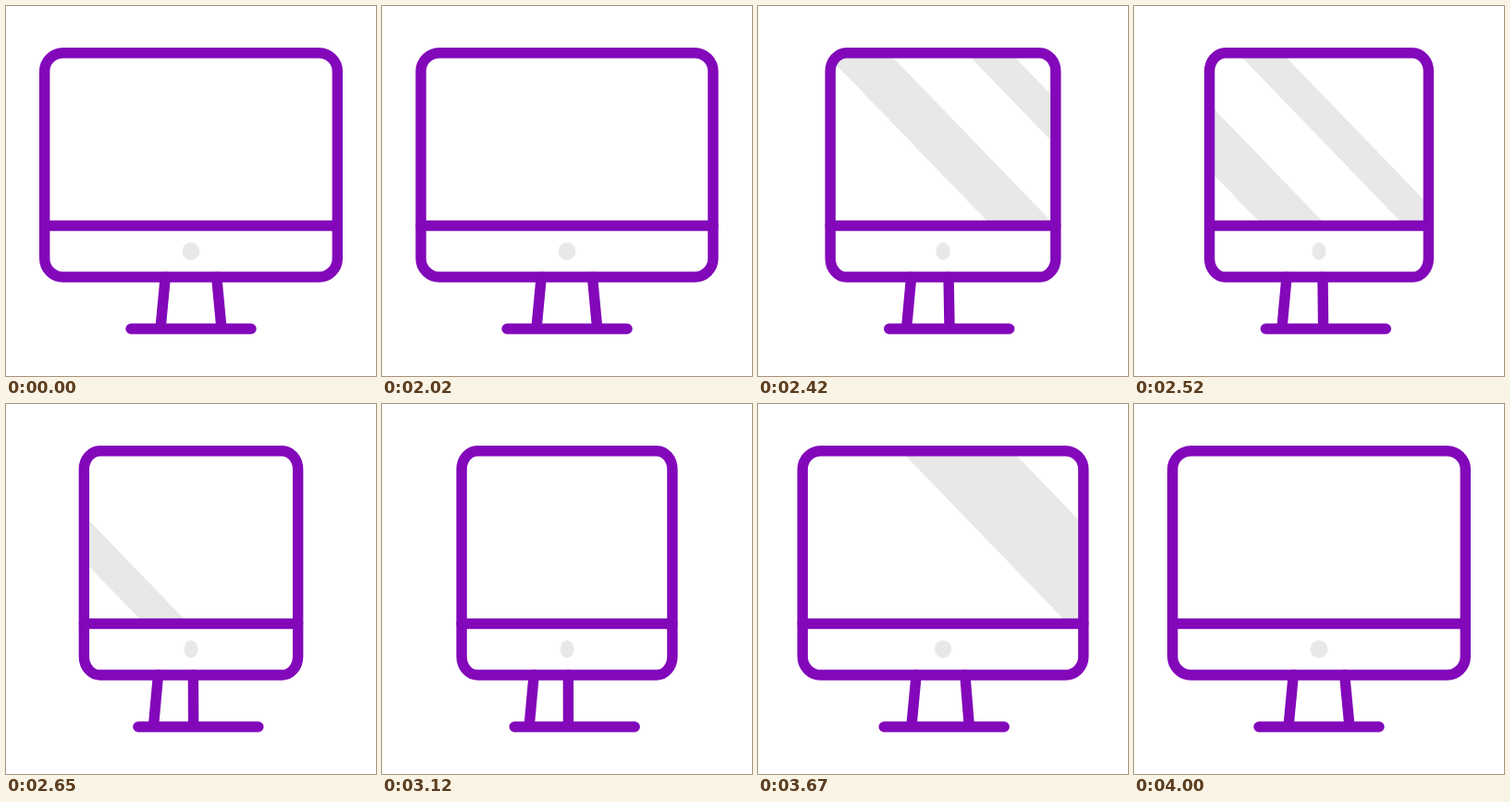
Write an HTML page without scripts that moves like this. It is 400 px wide and 400 px high and loops after 4.02 s.

```html
<!DOCTYPE html>
<html lang="en">
<head>
<meta charset="utf-8">
<title>Turning monitor</title>
<style>
  html, body { margin: 0; width: 100%; height: 100%; overflow: hidden; background: #fff; }
  svg { display: block; width: 100vw; height: 100vh; }

  .line { fill: none; stroke: #8208ba; stroke-width: 11.4; stroke-linecap: round; }
  .shade { fill: #e8e8e8; }

  /* rest 2 s, turn away 1 s, turn back 1 s */
  .case, .stand, .button, .glare, .sheen {
    animation: 4020ms linear infinite both;
  }
  .case { animation-name: case; }
  .stand { animation-name: stand; }
  .button { animation-name: button; transform-origin: 200px 265px; }
  .glare { animation-name: glare; }
  .sheen { animation-name: sheen; }

  @keyframes case {
    0% { x: 41.7px; width: 316.6px; rx: 20px; }
    49.751% { x: 41.7px; width: 316.6px; rx: 20px; animation-timing-function: cubic-bezier(.28, .08, .03, 1); }
    74.627% { x: 86.7px; width: 226.6px; rx: 17px; animation-timing-function: cubic-bezier(.65, 0, .35, 1); }
    99.502%, 100% { x: 41.7px; width: 316.6px; rx: 20px; }
  }

  @keyframes stand {
    0% { d: path("M41.7 237.5L358.3 237.5M172.3 293L167 349M227.7 293L233 349M135 349L265 349"); }
    49.751% {
      d: path("M41.7 237.5L358.3 237.5M172.3 293L167 349M227.7 293L233 349M135 349L265 349");
      animation-timing-function: cubic-bezier(.28, .08, .03, 1);
    }
    74.627% {
      d: path("M86.7 237.5L313.3 237.5M164.1 293L159 349M201 293L201 349M143.3 349L273.3 349");
      animation-timing-function: cubic-bezier(.65, 0, .35, 1);
    }
    99.502%, 100% { d: path("M41.7 237.5L358.3 237.5M172.3 293L167 349M227.7 293L233 349M135 349L265 349"); }
  }

  @keyframes button {
    0% { transform: scaleX(1); }
    49.751% { transform: scaleX(1); animation-timing-function: cubic-bezier(.28, .08, .03, 1); }
    74.627% { transform: scaleX(.77); animation-timing-function: cubic-bezier(.65, 0, .35, 1); }
    99.502%, 100% { transform: scaleX(1); }
  }

  /* two stripes pass to the left */
  @keyframes glare {
    0% { transform: translateX(538px); }
    49.751% { transform: translateX(538px); animation-timing-function: cubic-bezier(.333, 0, .667, 1); }
    74.627%, 100% { transform: translateX(-222px); }
  }

  /* one wide stripe passes to the right, narrowing */
  @keyframes sheen {
    0%, 74.627% { x: -260px; width: 238px; animation-timing-function: cubic-bezier(.333, 0, .667, 1); }
    99.502%, 100% { x: 530px; width: 80px; }
  }
</style>
</head>
<body>
<svg viewBox="0 0 400 400">
  <clipPath id="screen">
    <rect class="case" x="41.7" y="50.7" width="316.6" height="186.8" rx="20"/>
  </clipPath>

  <g clip-path="url(#screen)">
    <g class="shade" transform="translate(0 232) skewX(44)">
      <g class="glare">
        <rect y="-185" width="69" height="195"/>
        <rect x="153" y="-185" width="48" height="195"/>
      </g>
      <rect class="sheen" x="-260" y="-185" width="238" height="195"/>
    </g>
  </g>

  <circle class="shade button" cx="200" cy="265" r="9.5"/>
  <path class="line stand" d="M41.7 237.5L358.3 237.5M172.3 293L167 349M227.7 293L233 349M135 349L265 349"/>
  <rect class="line case" x="41.7" y="50.7" width="316.6" height="242.3" rx="20" ry="20"/>
</svg>
</body>
</html>
```
